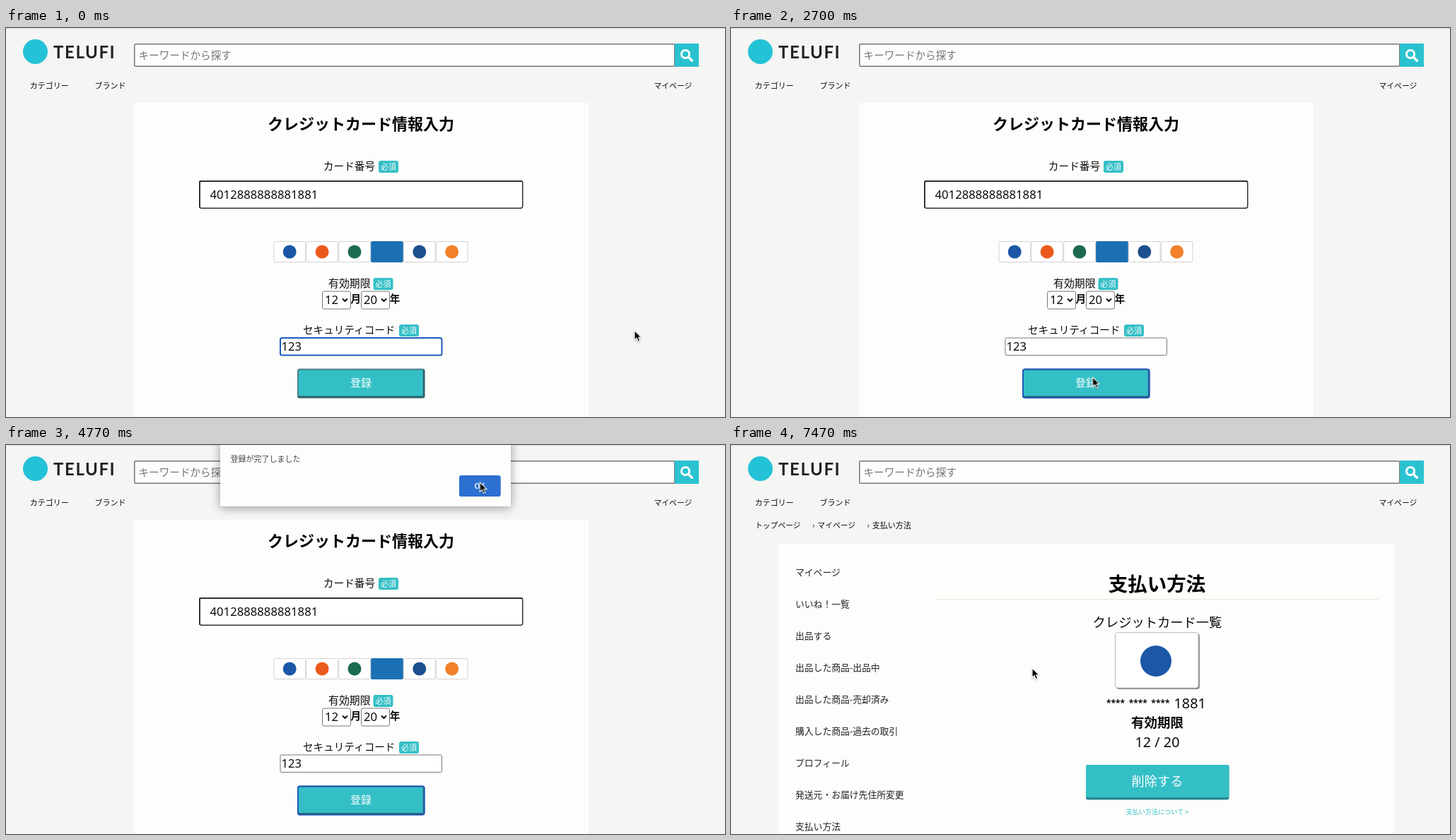
An HTML page for the animation above (7510 ms loop, 1017 by 551 pixels).

```html
<!DOCTYPE html>
<html lang="ja">
<head>
<meta charset="utf-8">
<title>カード登録</title>
<style>
  html, body { margin: 0; width: 100%; height: 100%; overflow: hidden; background: #f5f5f3; }
  svg { display: block; width: 100%; height: 100%; }
  text { font-family: "Noto Sans CJK JP", "Noto Sans CJK", "Noto Sans", sans-serif; white-space: pre; }
  .num { font-family: "Noto Sans", sans-serif; }
  .mark { font-family: Lato, sans-serif; font-weight: 700; letter-spacing: 1.6px; }
  .ok { font-family: Roboto, sans-serif; font-weight: 500; }
  .bold { font-weight: 700; }
  .stars { font-family: "Noto Sans", sans-serif; font-weight: 700; word-spacing: 2.4px; }
  #dialog > rect:first-child { filter: drop-shadow(0 2px 7px rgba(0, 0, 0, .38)); }
  #pointer { filter: drop-shadow(0 1px 1px rgba(0, 0, 0, .3)); }
</style>
</head>
<body>
<svg id="stage" viewBox="0 0 1017 551" preserveAspectRatio="none">
  <g id="header"></g>
  <g id="form"></g>
  <g id="payment"></g>
  <g id="dialog"></g>
  <g id="cursor">
    <path id="pointer" d="M0 0V13.4L3.1 10.6L5.2 15.5L7.7 14.4L5.6 9.7H9.7Z" fill="#000" stroke="#fff" stroke-width="1.1"/>
    <g id="beam" fill="none">
      <path d="M-2.5 -6.5Q0 -6.5 .5 -5Q1 -6.5 3.5 -6.5M.5 -5V6.5M-2.5 8Q0 8 .5 6.5Q1 8 3.5 8M-1 3H2" stroke="#fff" stroke-width="2.6"/>
      <path d="M-2.5 -6.5Q0 -6.5 .5 -5Q1 -6.5 3.5 -6.5M.5 -5V6.5M-2.5 8Q0 8 .5 6.5Q1 8 3.5 8M-1 3H2" stroke="#111" stroke-width="1.2"/>
    </g>
  </g>
</svg>
<script>
const LOOP = 7510;
const TEAL = '#34bfc6', INK = '#0c0c0c', PAPER = '#fdfdfb';
const $ = id => document.getElementById(id);

function add(parent, tag, attrs, content = '') {
  const el = document.createElementNS('http://www.w3.org/2000/svg', tag);
  for (const key in attrs) el.setAttribute(key, attrs[key]);
  el.textContent = content;
  parent.append(el);
  return el;
}

// Boxes are given by their outer edges; the line is drawn inside.
function box(parent, left, top, right, bottom, fill, { line, width = 0, rx = 0 } = {}) {
  return add(parent, 'rect', {
    x: left + width / 2, y: top + width / 2,
    width: right - left - width, height: bottom - top - width,
    rx, fill, stroke: line || 'none', 'stroke-width': width
  });
}

const label = (parent, x, y, size, content, fill = INK, cls = '', anchor = 'start') =>
  add(parent, 'text', { x, y, 'font-size': size, fill, class: cls, 'text-anchor': anchor }, content);

const centred = (parent, x, y, size, content, fill = INK, cls = '') =>
  label(parent, x, y, size, content, fill, cls, 'middle');

const stroke = (parent, d, color, width) =>
  add(parent, 'path', { d, fill: 'none', stroke: color, 'stroke-width': width, 'stroke-linecap': 'round', 'stroke-linejoin': 'round' });

function badge(parent, x, y) {
  box(parent, x, y, x + 28, y + 17, TEAL, { rx: 3 });
  centred(parent, x + 14, y + 12.6, 11, '必須', '#fff');
}

function select(parent, x, value) {
  box(parent, x, 372.5, x + 41, 398.5, '#fff', { line: '#777', width: 1, rx: 2.5 });
  label(parent, x + 4, 391, 16.8, value, INK, 'num');
  stroke(parent, `M${x + 29.5} 384l3 3l3 -3`, '#111', 2);
}

function buildHeader(g) {
  box(g, 0, 0, 1017, 551, '#f5f5f3');
  box(g, 0, 0, 1017, 1, '#dcdce0');
  add(g, 'circle', { cx: 41.5, cy: 33.5, r: 17.5, fill: '#24c2d6' });
  label(g, 67, 43, 24, 'TELUFI', '#222', 'mark');
  box(g, 181, 22, 946.5, 55, PAPER, { line: '#777', width: 1.5, rx: 2 });
  label(g, 187.5, 43.7, 14.6, 'キーワードから探す', '#757575');
  box(g, 946, 22, 980, 55, '#2bc2d0');
  add(g, 'circle', { cx: 961, cy: 37, r: 5.6, fill: 'none', stroke: '#fff', 'stroke-width': 3 });
  stroke(g, 'M965.5 41.5L970.3 46.3', '#fff', 3.4);
  label(g, 33.7, 85.8, 11, 'カテゴリー');
  label(g, 125.5, 85.8, 11, 'ブランド');
  label(g, 916.5, 85.8, 10.8, 'マイページ');
}

function buildForm(g) {
  box(g, 181, 106, 824, 551, PAPER);
  centred(g, 502, 143.5, 22, 'クレジットカード情報入力', '#000', 'bold');
  label(g, 448.8, 201, 14.7, 'カード番号');
  badge(g, 527, 188);
  box(g, 273, 216, 731.5, 256, '#fff', { line: '#333', width: 1.5, rx: 3 });
  stroke(g, 'M274 254V217H730', '#222', 1.4);
  label(g, 288.5, 241.5, 16.7, '4012888888881881', INK, 'num');

  ['#1b57a6', '#eb5a1c', '#1d6b4f', null, '#1c4f8f', '#f0802a'].forEach((color, i) => {
    const x = 378.5 + i * 45.9;
    box(g, x, 302, x + 45.5, 332, color ? '#fff' : '#1b70b4', { line: color ? '#d3d3da' : '#1b70b4', width: 1, rx: 1 });
    if (color) add(g, 'circle', { cx: x + 22.7, cy: 317, r: 9.5, fill: color });
  });

  label(g, 456, 367, 14.9, '有効期限');
  badge(g, 519.5, 354);
  select(g, 447, '12');
  label(g, 487.5, 389.3, 14.6, '月', INK, 'bold');
  select(g, 502, '20');
  label(g, 542.7, 389.3, 14.6, '年', INK, 'bold');

  label(g, 420, 432.5, 14.6, 'セキュリティコード');
  badge(g, 556, 420);
  box(g, 387.5, 438.5, 617, 464, '#fff', { line: '#777', width: 1, rx: 2 });
  box(g, 387, 438, 617.5, 464.5, 'none', { line: '#1f5bc0', width: 2, rx: 2.5 }).id = 'codeFocus';
  label(g, 389.5, 457, 16.6, '123', INK, 'num');

  box(g, 412, 482.5, 592.5, 524.5, TEAL, { line: '#4f7f88', width: 2, rx: 2.5 });
  stroke(g, 'M414 522.5H591V485', '#2f5f68', 2.4);
  box(g, 412, 482.5, 592.5, 524.5, 'none', { line: '#1f58bb', width: 2, rx: 3 }).id = 'buttonFocus';
  centred(g, 502, 508, 15, '登録', '#fff');
}

function buildPayment(g) {
  label(g, 34, 117.8, 10.8, 'トップページ');
  label(g, 115, 117.8, 10.8, '›');
  label(g, 122.3, 117.8, 10.8, 'マイページ');
  label(g, 192.5, 117.8, 10.8, '›');
  label(g, 199.8, 117.8, 11, '支払い方法');
  box(g, 67, 140, 938, 551, PAPER);
  ['マイページ', 'いいね！一覧', '出品する', '出品した商品-出品中', '出品した商品-売却済み',
   '購入した商品-過去の取引', 'プロフィール', '発送元・お届け先住所変更', '支払い方法']
    .forEach((item, i) => label(g, 91, 185.2 + i * 44.95, 12.8, item, '#222'));

  centred(g, 602.5, 206.6, 27.5, '支払い方法', '#000', 'bold');
  box(g, 292, 218, 916, 219, '#e6e6dc');
  centred(g, 603, 257.7, 18.3, 'クレジットカード一覧');
  box(g, 545, 267, 663, 346, '#8d8d92', { rx: 4 });
  box(g, 543, 265, 661.5, 344.5, '#fff', { line: '#bcbcc0', width: 1, rx: 4 });
  add(g, 'circle', { cx: 601, cy: 306, r: 22, fill: '#1b57a6' });
  label(g, 531, 370.2, 12, '**** **** ****', INK, 'stars');
  label(g, 626.5, 373, 19.8, '1881', INK, 'num');
  centred(g, 603, 400, 18.5, '有効期限', INK, 'bold');
  centred(g, 603, 428.2, 19.8, '12 / 20', INK, 'num');
  box(g, 502, 453, 704.5, 502.5, '#2a8794', { rx: 3 });
  box(g, 502, 453, 704.5, 499, TEAL, { rx: 2.5 });
  centred(g, 603, 482.8, 18.2, '削除する', '#fff');
  centred(g, 603, 523.3, 9.1, '支払い方法について >', TEAL);
}

function buildDialog(g) {
  box(g, 303, -8, 714, 87, PAPER, { rx: 2 });
  label(g, 317.5, 24, 11, '登録が完了しました', '#444');
  box(g, 641, 43, 699.5, 73, '#1c63df', { rx: 3.5 });
  box(g, 641, 43, 699.5, 73, '#2c70d2', { rx: 3.5 }).id = 'okHover';
  centred(g, 670, 62, 11.3, 'OK', '#fff', 'ok');
}

// Steps are [ms, value, easing towards the next step].
function loop(el, prop, steps) {
  const frames = steps.map(([ms, value, easing = 'linear']) => ({ offset: ms / LOOP, [prop]: value, easing }));
  frames.push({ offset: 1, [prop]: steps.at(-1)[1] });
  el.animate(frames, { duration: LOOP, iterations: Infinity });
}

// Visible only between the two times.
function showBetween(id, from, to) {
  const steps = [[0, from > 0 ? 0 : 1, 'step-end']];
  if (from > 0) steps.push([from, 1, 'step-end']);
  if (to < LOOP) steps.push([to, 0, 'step-end']);
  loop($(id), 'opacity', steps);
}

buildHeader($('header'));
buildForm($('form'));
buildPayment($('payment'));
buildDialog($('dialog'));

const CLICK = 2650, ALERT = 2750, CLOSE = 5150, SWITCH = 5850, LEAVE_FIELD = 5960;
showBetween('codeFocus', 0, CLICK);
showBetween('buttonFocus', CLICK, LOOP);
showBetween('dialog', ALERT, CLOSE);
showBetween('okHover', 4330, CLOSE);
showBetween('form', 0, SWITCH);
showBetween('payment', SWITCH, LOOP);
showBetween('beam', CLOSE, LEAVE_FIELD);
loop($('pointer'), 'opacity', [[0, 1, 'step-end'], [CLOSE, 0, 'step-end'], [LEAVE_FIELD, 1, 'step-end']]);

const at = (x, y) => `translate(${x}px, ${y}px)`;
loop($('cursor'), 'transform', [
  [0, at(889, 428.5)],
  [500, at(889, 428.5), 'ease-in-out'],
  [1600, at(512.5, 492.5)],
  [2300, at(512.5, 492.5)],
  [2600, at(511.5, 494.5)],
  [3500, at(511.5, 494.5), 'ease-in-out'],
  [4500, at(670.3, 52.8)],
  [5750, at(670.3, 52.8), 'ease-in-out'],
  [6350, at(641, 105)],
  [6550, at(641, 105), 'ease-in-out'],
  [7300, at(426, 316)]
]);
</script>
</body>
</html>
```
